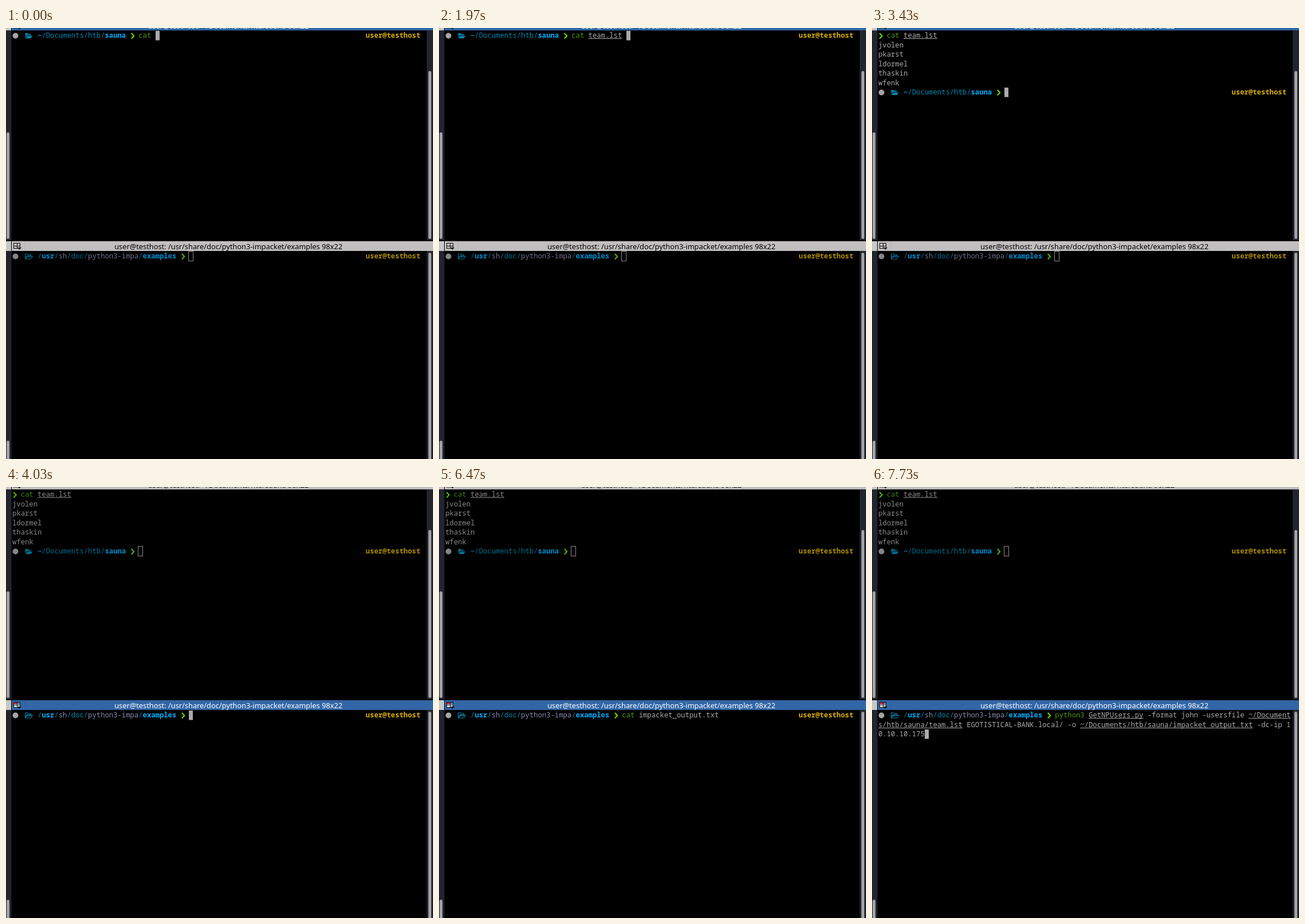
Animation, 745 px wide and 752 px high, one loop 8 s. Source, as an HTML page with a canvas:

```html
<!DOCTYPE html>
<html lang="en">
<head>
<meta charset="utf-8">
<title>Split terminal</title>
<style>
  html, body { margin: 0; width: 100%; height: 100%; overflow: hidden; background: #000; }
  canvas { display: block; }
</style>
</head>
<body>
<canvas id="stage" width="745" height="752"></canvas>
<script>
const ctx = document.getElementById('stage').getContext('2d');
const LOOP = 8000, COLS = 98, CELL_W = 7.34, CELL_H = 16.5, LEFT = 11;
const HOST = 'user@testhost';
const USERS = ['jvolen', 'pkarst', 'ldormel', 'thaskin', 'wfenk'];
const GREY = '#aaaaaa', GREEN = '#4e9a06', LIME = '#5fd700', GOLD = '#d7af00',
      SKY = '#00afff', BLUE = '#0087af', MAUVE = '#8787af';

// Timelines: [start in ms, value]
const TYPED = [[0, ''], [330, 't'], [470, 'te'], [550, 'tea'], [630, 'tean'], [1070, 'tea'],
  [1270, 'team'], [1430, 'team.'], [1670, 'team.l'], [1970, 'team.lst ']];
const TOP_CURSOR = [[0, true], [2870, false], [3430, true]];
const RECALLED = [[0, ''], [5230, 'clear'], [5770, 'cat impacket_output.txt'], [6730, 'python']];
const LOW_CURSOR = [[0, true], [4730, false], [5230, true], [6470, false],
  [6730, true], [7270, false], [7730, true]];
const at = (timeline, t) => timeline.filter(step => step[0] <= t).pop()[1];

function rect(x, y, w, h, color) {
  ctx.fillStyle = color;
  ctx.fillRect(x, y, w, h);
}

function thumb(x, y, w, h) {
  ctx.fillStyle = '#a2a3a6';
  ctx.beginPath();
  ctx.roundRect(x, y, w, h, 2.5);
  ctx.fill();
}

const cellX = col => LEFT + col * CELL_W;

// Writes on the character grid, wrapping at the last column; returns the next cell.
function put(top, cell, str, color, { bold = false, line = false } = {}) {
  ctx.font = `${bold ? 'bold ' : ''}12.23px "Noto Sans Mono", monospace`;
  ctx.textAlign = 'left';
  ctx.fillStyle = color;
  for (const ch of str) {
    const x = cellX(cell % COLS);
    const base = Math.round(top + Math.floor(cell / COLS) * CELL_H + 12.4);
    ctx.fillText(ch, x, base);
    if (line) ctx.fillRect(x, base + 1, CELL_W, 1);
    cell++;
  }
  return cell;
}

function chevron(top, col) {
  const x = cellX(col) + 2.2, y = top + 4;
  ctx.strokeStyle = LIME;
  ctx.lineWidth = 2.2;
  ctx.beginPath();
  ctx.moveTo(x, y);
  ctx.lineTo(x + 4.4, y + 4.8);
  ctx.lineTo(x, y + 9.6);
  ctx.stroke();
}

function cursor(top, cell, filled) {
  const x = Math.round(cellX(cell % COLS));
  const y = Math.round(top + Math.floor(cell / COLS) * CELL_H);
  if (filled) return rect(x, y, 7, 16.5, GREY);
  ctx.strokeStyle = GREY;
  ctx.lineWidth = 1;
  ctx.strokeRect(x - 0.5, y - 0.5, 8, 17);
}

function folder(top, filled) {
  const y = top + 3.5;
  ctx.fillStyle = ctx.strokeStyle = BLUE;
  ctx.lineWidth = 1.1;
  const shape = points => {
    ctx.beginPath();
    points.forEach(([px, py]) => ctx.lineTo(px, y + py));
    ctx.closePath();
    filled ? ctx.fill() : ctx.stroke();
  };
  shape([[33.5, 8], [33.5, 0.5], [37.5, 0.5], [39, 2], [43.5, 2], [43.5, 4], [36.5, 4]]);
  shape([[33.7, 9.5], [37, 4.9], [46.3, 4.9], [43.3, 9.5]]);
}

// path: [text, color, bold] parts; returns the cell where the command starts.
function prompt(top, path, filledFolder, showHost = true) {
  ctx.fillStyle = '#a5a5a5';
  ctx.beginPath();
  ctx.arc(16.5, top + 8.5, 5, 0, 7);
  ctx.fill();
  folder(top, filledFolder);
  let cell = 6;
  for (const [str, color, bold] of path) cell = put(top, cell, str, color, { bold });
  chevron(top, cell + 1);
  if (showHost) put(top, 84, HOST, GOLD, { bold: true });
  return cell + 3;
}

const HOME = [['~', SKY, true], ['/Documents/htb/', BLUE], ['sauna', SKY, true]];
const EXAMPLES = [['/', BLUE], ['usr', SKY, true], ['/', BLUE], ['sh', MAUVE], ['/doc/', BLUE],
  ['python3-impa', MAUVE], ['/', BLUE], ['examples', SKY, true]];

function titleBar(bottom, active, path, right) {
  ctx.save();
  ctx.beginPath();
  ctx.rect(0, bottom - 17, 745, 17);
  ctx.clip();
  rect(0, bottom - 17, 9, 17, '#c8c7c7');
  rect(10, bottom - 17, 735, 17, active ? '#3266a6' : '#c0bebf');
  rect(32.5, bottom - 17, 1, 17, active ? '#2b5c98' : '#b2b0b1');

  const y = bottom - 14;
  if (active) {
    rect(14, y, 11, 9, '#eeeeee');
    rect(14, y, 5, 4, '#e01b24');
    rect(20, y, 5, 4, '#2a78d0');
  }
  ctx.strokeStyle = '#111';
  ctx.lineWidth = 1;
  ctx.strokeRect(13.5, y + 0.5, 11, 9);
  ctx.beginPath();
  ctx.moveTo(19.5, y); ctx.lineTo(19.5, y + 9);
  ctx.moveTo(14, y + 5.5); ctx.lineTo(25, y + 5.5);
  ctx.stroke();
  ctx.fillStyle = '#111';
  ctx.beginPath();
  ctx.moveTo(20, y + 8); ctx.lineTo(27, y + 8); ctx.lineTo(23.5, y + 12);
  ctx.fill();

  ctx.font = '12.8px "Noto Sans", sans-serif';
  ctx.textAlign = 'right';
  ctx.fillStyle = active ? '#fff' : '#000';
  ctx.fillText(`${HOST}: ${path} 98x22`, right, bottom - 3.5);
  ctx.restore();
}

function topPane(t, active) {
  const top = 5;
  ctx.globalAlpha = active ? 1 : 0.81;
  let row = 0, cell;
  if (t < 2300) {
    cell = put(top, prompt(top, HOME, true), 'cat ', GREEN);
    const word = at(TYPED, t), name = word.trimEnd();
    put(top, cell, name, GREY, { line: name !== 'tean' });
    cell += word.length;
  } else {
    chevron(top, 0);
    put(top, put(top, 2, 'cat ', GREEN), 'team.lst', GREY, { line: true });
    USERS.forEach((user, i) => put(top, (i + 1) * COLS, user, GREY));
    row = USERS.length + 1;
    cell = prompt(top + row * CELL_H, HOME, true);
  }
  if (!active || at(TOP_CURSOR, t)) cursor(top + row * CELL_H, cell, active);
  ctx.globalAlpha = 1;
}

function lowPane(t, active) {
  const top = 390, command = at(RECALLED, t), long = command === 'python';
  ctx.globalAlpha = active ? 1 : 0.81;
  let cell = prompt(top, EXAMPLES, false, !long);
  if (long) {
    const line = true;
    cell = put(top, cell, 'python3 ', GREEN);
    cell = put(top, cell, 'GetNPUsers.py', GREY, { line });
    cell = put(top, cell, ' -format john -usersfile ', GREY);
    cell = put(top, cell, '~/Documents/htb/sauna/team.lst', GREY, { line });
    cell = put(top, cell, ' EGOTISTICAL-BANK.local/ -o ', GREY);
    cell = put(top, cell, '~/Documents/htb/sauna/impacket_output.txt', GREY, { line });
    cell = put(top, cell, ' -dc-ip 10.10.10.175', GREY);
  } else {
    const [verb, arg] = command.split(' ');
    cell = put(top, cell, verb, GREEN);
    if (arg) cell = put(top, cell, ' ' + arg, GREY);
  }
  if (!active || at(LOW_CURSOR, t)) cursor(top, cell, active);
  ctx.globalAlpha = 1;
}

function draw(now) {
  const t = now % LOOP, topActive = t < 4030;
  rect(0, 0, 745, 752, '#000');
  for (const [y, h] of [[4.5, 366], [389, 363]]) {
    rect(0, y, 9.5, h, '#23252e');
    rect(734, y, 11, h, '#23252e');
  }
  thumb(1, 182, 5, 186);
  thumb(1, 720, 5, 40);
  thumb(737, 75, 5, 293);
  thumb(737, 392, 5, 370);
  titleBar(4.5, topActive, '~/Documents/htb/sauna', 528);
  titleBar(389, !topActive, '/usr/share/doc/python3-impacket/examples', 587);
  topPane(t, topActive);
  lowPane(t, !topActive);
}

const start = performance.now();
function frame() {
  draw(performance.now() - start);
  requestAnimationFrame(frame);
}
frame();
</script>
</body>
</html>
```
